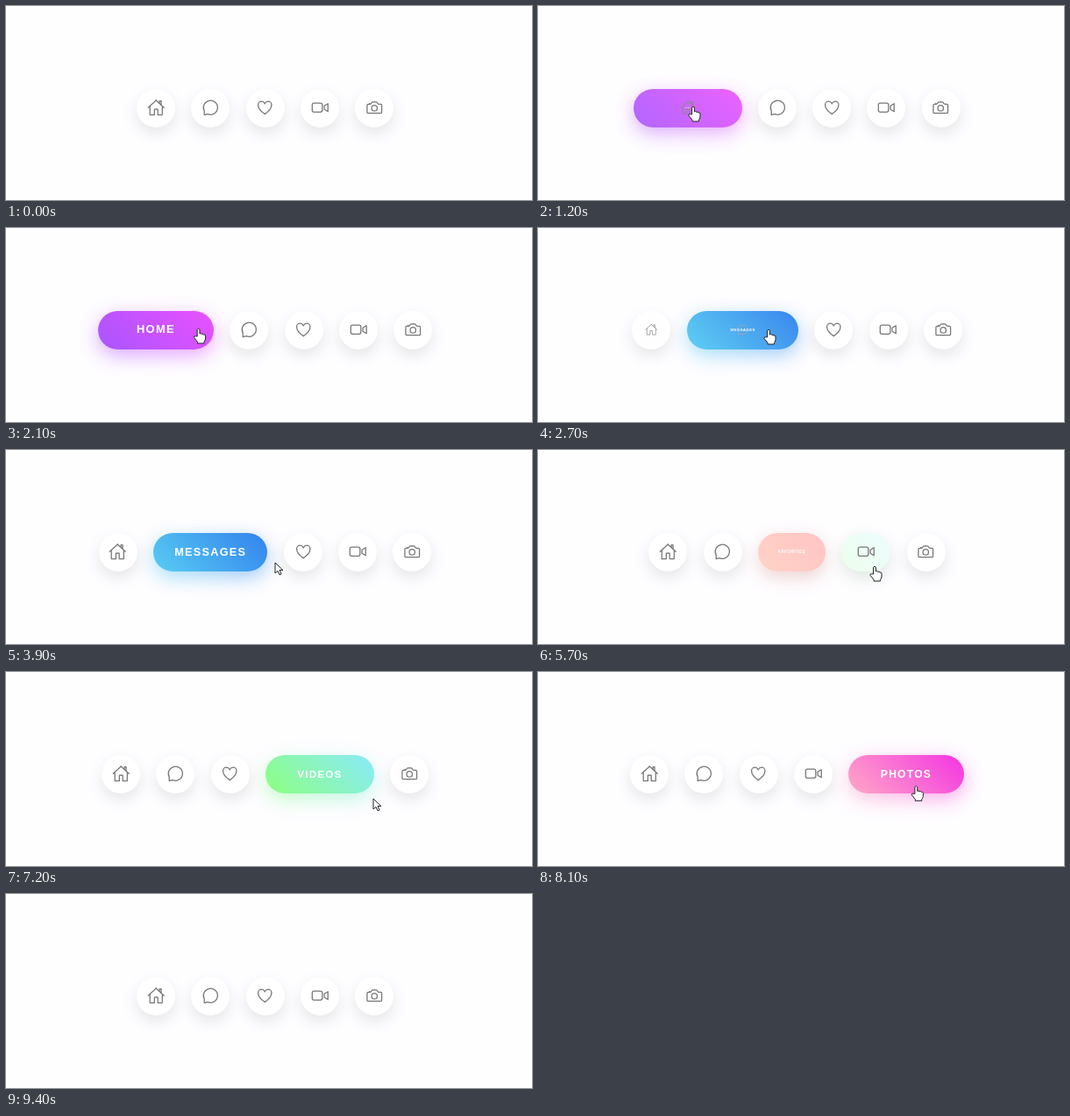
Write an HTML page that moves like this. It is 600 px wide and 222 px high and loops after 10 s.

```html
<!DOCTYPE html>
<html lang="en">
<head>
<meta charset="utf-8">
<title>Gradient icon menu</title>
<style>
html, body { margin: 0; width: 100%; height: 100%; overflow: hidden; background: #fefdff; }
ul {
  position: absolute; left: 0; top: 95.2px; width: 591px; margin: 0; padding: 0;
  display: flex; justify-content: center; gap: 18.3px; list-style: none; isolation: isolate;
}
li {
  position: relative; flex: none; height: 44px; border-radius: 22px; background: #fff;
  width: calc(44px + 88px * var(--open));
  box-shadow: 0 7.3px 18px rgba(0, 0, 0, calc(.1 - .1 * var(--open)));
}
li::before, li::after {
  content: ""; position: absolute; inset: 0; border-radius: 22px;
  background: linear-gradient(45deg, var(--from), var(--to)); opacity: var(--open);
}
li::after { top: 7.3px; bottom: -7.3px; z-index: -1; filter: blur(11px); opacity: calc(.5 * var(--open)); }
li svg {
  position: absolute; z-index: 1; left: calc(50% - 10.25px); top: 10.8px; width: 20.5px; height: 20.5px;
  fill: none; stroke-width: 2; stroke-linecap: round; stroke-linejoin: round;
  stroke: color-mix(in srgb, #fff calc(100% * var(--gone)), #777);
  transform: scale(calc(1 - var(--gone)));
}
li span {
  position: absolute; z-index: 1; inset: -1.5px 0 1.5px;
  display: flex; align-items: center; justify-content: center;
  font: bold 12.9px "Liberation Sans", Arial, sans-serif; letter-spacing: 1.29px; white-space: nowrap;
  color: #fff; transform: scale(var(--label));
}
#cursor { position: absolute; left: 0; top: 0; overflow: visible; width: 1px; height: 1px; }
#cursor path { fill: #fff; stroke: #222; stroke-linejoin: round; }
</style>
</head>
<body>
<ul></ul>
<svg id="cursor"><path/></svg>
<script>
const LOOP = 10000, STEP = 100, DURATION = 500, DELAY = 250;

const line = d => `<path d="${d}"/>`;
const mirror = d => line(d) + `<g transform="scale(-1 1)">${line(d)}</g>`;

// enter and leave: when the pointer is over the item, in ms
const items = [
  { label: 'HOME', from: '#a955ff', to: '#ea51ff', enter: 888, leave: 2240,
    icon: mirror('M0-13L14 0M11-2.7V13H3V3H0') + line('M9-5v-7H6v4') },
  { label: 'MESSAGES', from: '#56ccf2', to: '#2f80ed', enter: 2340, leave: 3885,
    icon: line('M-11 6A12.6 12.6 0 1 1-5 11.5L-11 13z') },
  { label: 'FAVORITES', from: '#ff8a68', to: '#ff5e60', enter: 4050, leave: 5518,
    icon: mirror('M0-7s2-4 6-4c3 0 6 2.5 6 6C12 2 7 7 0 11.5') },
  { label: 'VIDEOS', from: '#80ff72', to: '#7ee8fa', enter: 5636, leave: 7150,
    icon: '<rect x="-14" y="-8" width="18" height="16" rx="3.2"/>' + line('M7.5-3L14-7V7L7.5 3z') },
  { label: 'PHOTOS', from: '#ffa9c6', to: '#f434e2', enter: 7500, leave: 8600,
    icon: mirror('M0-10H3q1 0 2 1.5L6-7q1 1 2 1h3q2 0 2 2V8q0 2-2 2H0') + '<circle cy="1" r="5"/>' + line('M-8.5-6v-1.5') },
];

// Pointer stops: time, x, y
const stops = [
  [600, 160, 180], [1200, 177, 115], [1900, 190, 115], [2340, 255, 115], [2700, 263, 116],
  [3900, 307, 129], [5000, 312, 127], [5700, 384, 133], [6500, 395, 128], [7000, 395, 128],
  [7200, 419, 145], [7500, 430, 137], [8400, 432, 127], [9050, 535, 224],
];
const ARROW = 'M0 0V12l3-2.6 2 4.4 2-.8-2-4.4h4z';
const HAND = 'M-1.4 9V1.2Q0-.8 1.4 1.2V6q1.3-1 2.4.4q1.3-.6 2.2.6q1.4-.4 2 1V12q-.6 2.4-1.6 3.4V17H-1V15.4L-5 10.4q-.4-2 1.6-1.6z';

const cursor = document.getElementById('cursor');
const shape = cursor.firstElementChild;
const list = document.querySelector('ul');
list.innerHTML = items.map(i =>
  `<li style="--from:${i.from};--to:${i.to}"><svg viewBox="-16 -16 32 32">${i.icon}</svg><span>${i.label}</span></li>`
).join('');

const bezier = (a, b, u) => 3 * u * (1 - u) ** 2 * a + 3 * u * u * (1 - u) * b + u ** 3;

// The CSS "ease" curve
function ease(x) {
  if (x <= 0) return 0;
  if (x >= 1) return 1;
  let lo = 0, hi = 1;
  for (let i = 0; i < 24; i++) {
    const mid = (lo + hi) / 2;
    if (bezier(.25, .25, mid) < x) lo = mid; else hi = mid;
  }
  return bezier(.1, 1, lo);
}

const hover = (t, enter, leave) => ease((t - enter) / DURATION) - ease((t - leave) / DURATION);

function drawCursor(t) {
  const next = stops.findIndex(s => s[0] > t);
  cursor.style.display = next > 0 ? '' : 'none';
  if (next < 1) return;
  const [t0, x0, y0] = stops[next - 1], [t1, x1, y1] = stops[next];
  const k = (t - t0) / (t1 - t0);
  shape.setAttribute('transform', `translate(${x0 + (x1 - x0) * k} ${y0 + (y1 - y0) * k})`);
  shape.setAttribute('d', items.some(i => t >= i.enter && t < i.leave) ? HAND : ARROW);
}

function draw(now) {
  const t = Math.floor(now % LOOP / STEP) * STEP;
  items.forEach(({ enter, leave }, i) => {
    const set = (name, value) => list.children[i].style.setProperty(name, value.toFixed(4));
    set('--open', hover(t, enter, leave));
    set('--gone', hover(t, enter + DELAY, leave + DELAY));
    set('--label', hover(t, enter + DELAY, leave));
  });
  drawCursor(t);
}

const start = performance.now();
(function tick() {
  draw(performance.now() - start);
  requestAnimationFrame(tick);
})();
</script>
</body>
</html>
```
